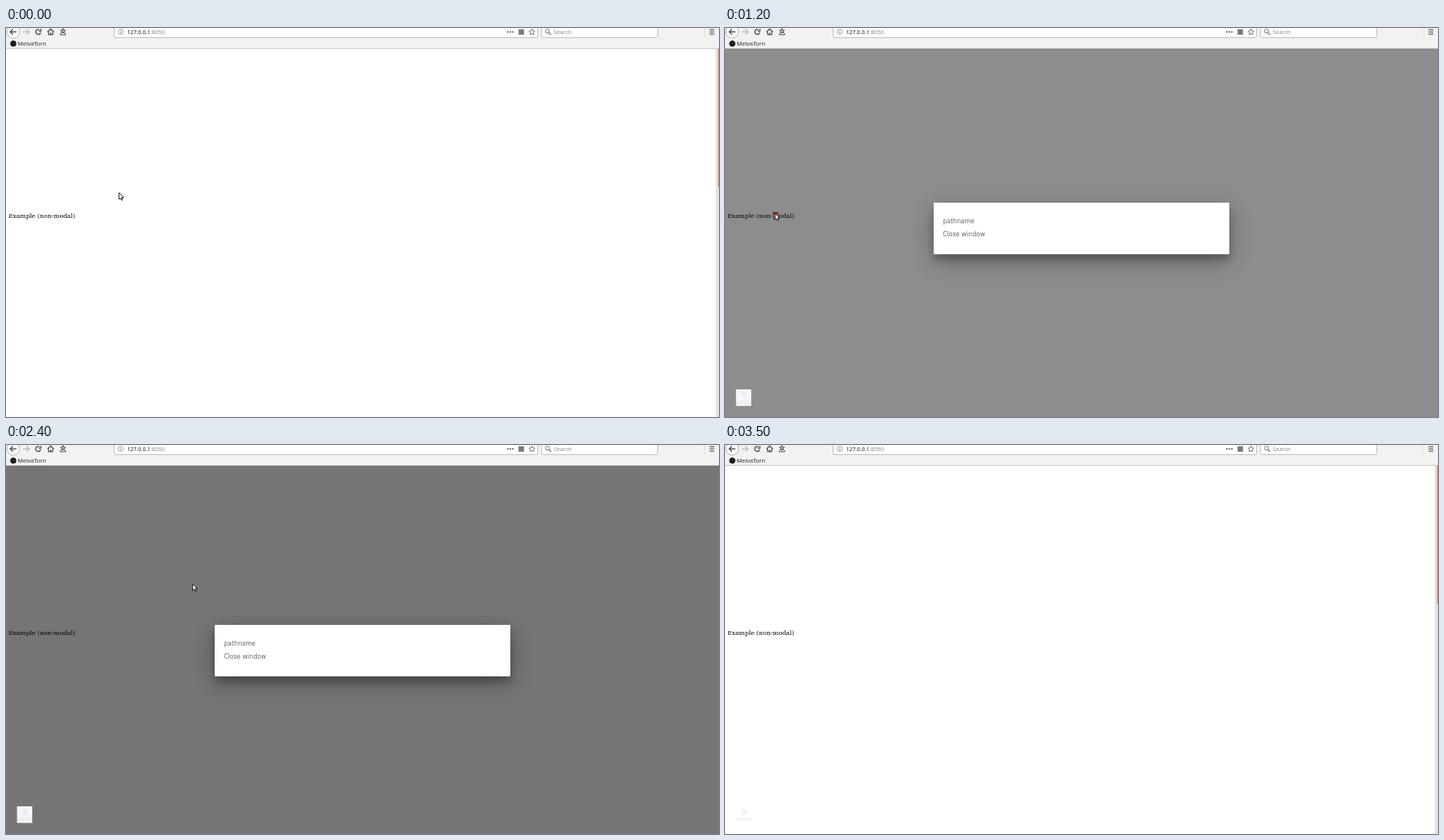
Recreate the animation shown at these times as an HTML page with a canvas. Size 926 by 506 pixels, loop 4 s.

```html
<!DOCTYPE html>
<html lang="en">
<head>
<meta charset="utf-8">
<title>Modal demo</title>
<style>
  html, body { margin: 0; width: 926px; height: 506px; overflow: hidden; background: #fff; }
  canvas { display: block; }
  #panel {
    position: absolute; left: 271.3px; top: 233.8px; width: 383.7px; height: 66.8px;
    box-sizing: border-box; padding: 16px 0 0 11.7px; border-radius: 1px;
    background: #fff; color: #666; font: 8px/17.5px "DejaVu Sans", sans-serif;
    box-shadow: 0 9px 29px rgba(0,0,0,.3), 0 7px 10px rgba(0,0,0,.22);
    visibility: hidden;
  }
</style>
</head>
<body>
<canvas id="stage" width="926" height="506"></canvas>
<div id="panel">pathname<br>Close window</div>
<script>
const ctx = document.getElementById('stage').getContext('2d');
const panel = document.getElementById('panel');
const LOOP = 4000, STEP = 100;
const OPEN = 1084, CLOSE = 2467;
const SANS = '"Noto Sans", "Open Sans", sans-serif';
const SERIF = '"DejaVu Serif", serif';

// start time, end time, from, to
const moves = [
  [300, 900, [146.8, 214.3], [65, 241]],
  [1800, 2200, [64.8, 241], [242.3, 180.6]],
  [2600, 2900, [242.3, 180.6], [109, 73]],
  [2900, 3300, [109, 73], [42, 3]],
  [3300, 3500, [42, 3], [40, -14]]
];

const clamp = v => Math.min(1, Math.max(0, v));

// cubic-bezier(.23, 1, .32, 1)
function easeOut(x) {
  x = clamp(x);
  let lo = 0, hi = 1;
  for (let i = 0; i < 24; i++) {
    const u = (lo + hi) / 2, v = 1 - u;
    if (.69 * u * v * v + .96 * u * u * v + u * u * u < x) lo = u; else hi = u;
  }
  return 1 - (1 - lo) ** 3;
}

function rect(x, y, w, h, color) {
  ctx.fillStyle = color;
  ctx.fillRect(x, y, w, h);
}

function text(str, x, y, font, color) {
  ctx.font = font;
  ctx.fillStyle = color;
  ctx.fillText(str, x, y);
}

function line(points, color, width = 1.2, closed = false, fill) {
  ctx.beginPath();
  points.forEach(([x, y]) => ctx.lineTo(x, y));
  if (closed) ctx.closePath();
  if (fill) { ctx.fillStyle = fill; ctx.fill(); }
  ctx.strokeStyle = color;
  ctx.lineWidth = width;
  ctx.stroke();
}

function arc(x, y, r, color, width = 1, from = 0, to = Math.PI * 2, fill) {
  ctx.beginPath();
  ctx.arc(x, y, r, from, to);
  if (fill) { ctx.fillStyle = fill; ctx.fill(); }
  ctx.strokeStyle = color;
  ctx.lineWidth = width;
  ctx.stroke();
}

function star(x, y, r, color, width) {
  const points = [];
  for (let i = 0; i < 10; i++) {
    const a = i * Math.PI / 5 - Math.PI / 2, d = i % 2 ? r * .48 : r;
    points.push([x + d * Math.cos(a), y + d * Math.sin(a)]);
  }
  line(points, color, width, true);
}

function field(x, w) {
  ctx.beginPath();
  ctx.roundRect(x, -6, w, 18.5, 2);
  ctx.fillStyle = '#fff';
  ctx.fill();
  ctx.strokeStyle = '#c2bfbb';
  ctx.lineWidth = 1;
  ctx.stroke();
}

function arrow(x, dir, color) {
  line([[x - 4 * dir, 5], [x + 4 * dir, 5]], color, 1.4);
  line([[x + .5 * dir, 1.5], [x + 4 * dir, 5], [x + .5 * dir, 8.5]], color, 1.4);
}

function toolbar() {
  const ink = '#4a4a4a';
  rect(0, 0, 926, 27, '#f3f2f1');
  rect(0, 26, 926, 1, '#cbc9c7');

  arc(9.5, 5, 8.3, '#b9b6b2', 1, 0, Math.PI * 2, '#fcfcfc');
  arrow(9.5, -1, ink);
  arrow(26, 1, '#bdbbb9');

  arc(41.8, 5.2, 3.2, ink, 1.3, .2, 5.3);
  line([[45.4, 1], [45.4, 4.2], [42.4, 4.2]], ink, 1.2);

  line([[53.8, 5.3], [58, 1.2], [62.2, 5.3]], ink, 1.3);
  line([[55.3, 5], [55.3, 8.7], [60.7, 8.7], [60.7, 5]], ink, 1.2);
  rect(57.3, 6, 1.4, 2.7, ink);

  star(74, 4, 3, ink, 1.1);
  line([[70.5, 7], [70.5, 8.8], [77.5, 8.8], [77.5, 7]], ink, 1);

  field(140.5, 550);
  arc(149, 5, 3.4, '#8a8a8a', .8);
  rect(148.6, 4.4, .9, 2.6, '#777');
  rect(148.6, 2.8, .9, .9, '#777');
  text('127.0.0.1', 157.2, 8, '7.2px ' + SANS, '#1c1c1c');
  const hostWidth = ctx.measureText('127.0.0.1').width;
  text(':8050', 157.2 + hostWidth, 8, '7.2px ' + SANS, '#858585');
  for (let i = 0; i < 3; i++) rect(651 + i * 3.2, 4.2, 1.8, 1.8, '#555');
  rect(665.6, 1.6, 7.2, 7.2, '#7b7b7b');
  star(683, 5.3, 4, '#666', .9);

  field(695.5, 151);
  arc(703.2, 4.1, 2.6, '#777', 1);
  line([[705.1, 6], [708, 9]], '#777', 1.2);
  text('Search', 711.2, 8.1, '7.4px ' + SANS, '#8d8d8d');

  rect(907, 0, 1, 12, '#e4e2e0');
  for (let i = 0; i < 3; i++) rect(913.7, 1.7 + i * 2.9, 6.2, 1.1, '#444');

  arc(9.5, 20.3, 3.6, '#1f1f1f', 1, 0, Math.PI * 2, '#1f1f1f');
  text('MelvaTorn', 15.2, 23.3, '7.5px ' + SANS, '#2b2b2b');
}

function pageText(selected) {
  const label = 'Example (non-modal)', font = '8px ' + SERIF, x = 3.2, y = 246.8;
  text(label, x, y, font, '#000');
  if (!selected) return;
  const left = x + ctx.measureText('Example (non-').width;
  const w = ctx.measureText('m').width;
  rect(left, 239, w, 9.7, '#f07746');
  text('m', left, y, font, '#fff');
}

function scrollbar() {
  rect(921.6, 27, 4.4, 479, '#e6e5e4');
  rect(924.6, 27, 1.4, 180, '#ee8a70');
}

function undoButton() {
  const blue = '#d5e7f3';
  rect(14.3, 470, 19.8, 21.6, 'rgba(255,255,255,.93)');
  arc(24.6, 477, 2.4, blue, 1.2, -2.2, 2.4);
  line([[22, 473.6], [22, 476], [24.4, 476]], blue, 1);
  text('undo', 14.2, 489.2, '8px ' + SERIF, blue);
}

function pointer(x, y) {
  const shape = [[0, 0], [0, 8.6], [1.9, 6.9], [3.3, 9.8], [4.7, 9.1], [3.4, 6.3], [6, 6.2]];
  line(shape.map(([a, b]) => [x + a, y + b]), '#111', 1, true, '#fff');
}

function textCaret(x, y) {
  for (const [color, w] of [['#fff', 2.2], ['#222', 1]]) {
    line([[x, y], [x, y + 8.5]], color, w);
    line([[x - 1.8, y], [x + 1.8, y]], color, w);
    line([[x - 1.8, y + 8.5], [x + 1.8, y + 8.5]], color, w);
  }
}

function pointerAt(t) {
  let pos = moves[0][2];
  for (const [start, end, from, to] of moves) {
    if (t < start) break;
    const k = clamp((t - start) / (end - start));
    pos = from.map((v, i) => v + (to[i] - v) * k);
  }
  return pos;
}

function draw(t) {
  const closing = t > CLOSE;
  const progress = ms => closing
    ? 1 - easeOut((t - CLOSE) / ms)
    : easeOut((t - OPEN) / ms);
  const fade = progress(400), slide = progress(450);
  const locked = t >= OPEN && !closing;

  rect(0, 0, 926, 506, '#fff');
  pageText(t >= 900 && t < 2400);
  rect(0, 27, 926, 479, `rgba(0,0,0,${.54 * fade})`);
  if (!locked) scrollbar();
  if (t >= OPEN) undoButton();
  toolbar();

  if (t >= 900 && t < OPEN) textCaret(66, 239.6);
  else if (t < 3500) pointer(...pointerAt(t));

  panel.style.visibility = fade > 0.001 ? 'visible' : 'hidden';
  panel.style.opacity = closing ? fade : 1;
  panel.style.transform = `translate(${closing ? -2.3 : 0}px, ${-32 * (1 - slide)}px)`;
}

function tick(now) {
  draw(Math.floor((now % LOOP) / STEP) * STEP);
  requestAnimationFrame(tick);
}
draw(0);
requestAnimationFrame(tick);
</script>
</body>
</html>
```
